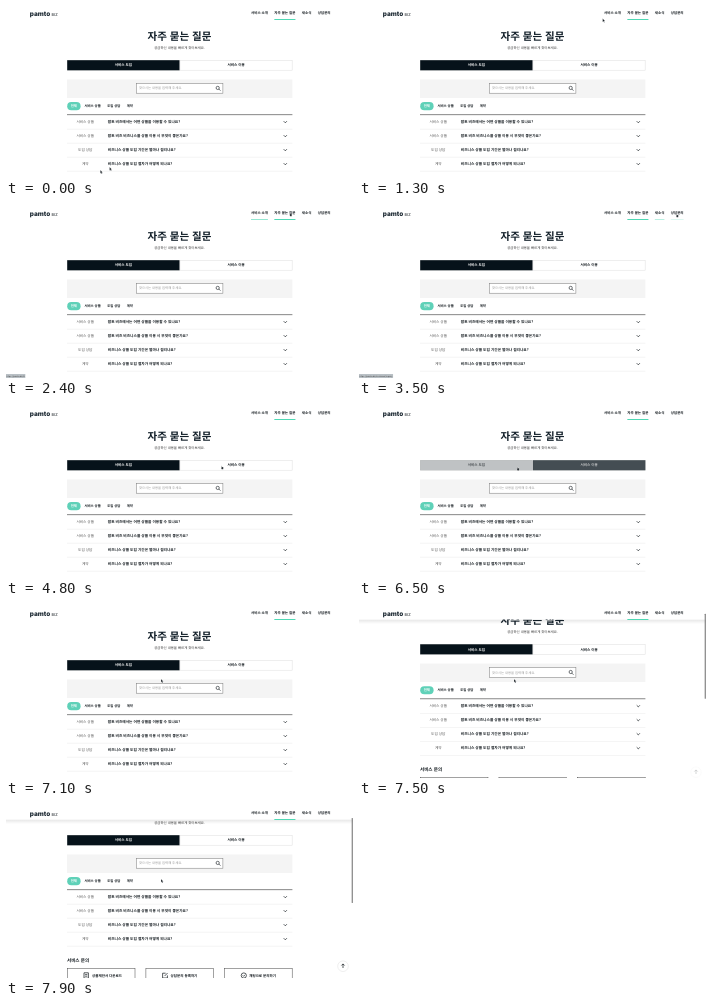
These frames come from a looping animation (347 px wide and 172 px high, 8000 ms). An HTML page:

```html
<!DOCTYPE html>
<html lang="ko">
<head>
<meta charset="utf-8">
<title>자주 묻는 질문</title>
<style>
html, body { margin: 0; width: 100%; height: 100%; overflow: hidden; background: #fff; }
svg { display: block; width: 100vw; height: 100vh; }
text { font-family: "Noto Sans CJK KR", "Noto Sans CJK", "Noto Sans CJK JP", sans-serif; text-rendering: geometricPrecision; }
.b { font-weight: 700; }
.m { font-weight: 500; }
.mid { text-anchor: middle; }
.brand, .latin { font-family: Inter, sans-serif; }
.brand { font-weight: 800; }
</style>
</head>
<body>
<svg id="stage" viewBox="0 0 347 172">
  <linearGradient id="shade" x2="0" y2="1">
    <stop stop-opacity="0.1"/><stop offset="1" stop-opacity="0"/>
  </linearGradient>
</svg>
<script>
const LOOP = 8000, STEP = 100;
const INK = '#10171c', DARK = '#06121a', TEAL = '#5fd1b8', MINT = '#4fd8b4';
const LEFT = 61, WIDTH = 225.4;
const stage = document.getElementById('stage');

function add(parent, tag, attrs, content) {
  const el = document.createElementNS('http://www.w3.org/2000/svg', tag);
  for (const k in attrs) el.setAttribute(k, attrs[k]);
  if (content) el.textContent = content;
  return parent.appendChild(el);
}
const group = p => add(p, 'g');
const rect = (p, x, y, width, height, fill, more) =>
  add(p, 'rect', { x, y, width, height, fill, ...more });
const frame = (p, x, y, w, h, stroke, more) =>
  rect(p, x, y, w, h, '#fff', { stroke, 'stroke-width': 0.5, ...more });
const path = (p, d, more) =>
  add(p, 'path', { d, fill: 'none', stroke: INK, 'stroke-width': 0.7, ...more });
const circle = (p, cx, cy, r, more) =>
  add(p, 'circle', { cx, cy, r, fill: 'none', stroke: INK, 'stroke-width': 0.6, ...more });
// y is the vertical middle of the line of text
const text = (p, s, x, y, size, cls = '', fill = INK) =>
  add(p, 'text', { x, y: y + size * 0.36, 'font-size': size, class: cls, fill }, s);

// Labels side by side with an even gap; returns the x and width of each
function textRow(p, labels, x, y, size, gap) {
  return labels.map(s => {
    const w = text(p, s, x, y, size, 'b').getComputedTextLength();
    const box = { x, w };
    x += w + gap;
    return box;
  });
}

const page = group(stage);
text(page, '자주 묻는 질문', 173.5, 30.3, 10.5, 'b mid', '#121f29');
text(page, '궁금하신 내용을 빠르게 찾아보세요.', 173.5, 41.7, 3.4, 'm mid', '#333');

const tabs = ['서비스 도입', '서비스 이용'].map((label, i) => {
  const w = WIDTH / 2, x = LEFT + i * w, cx = x + w / 2;
  frame(page, x + 0.25, 54.4, w - 0.5, 9.8, '#ddd');
  text(page, label, cx, 59.2, 3.55, 'b mid');
  const on = group(page);
  rect(on, x + 0.2, 54.2, w - 0.2, 10.1, DARK);
  text(on, label, cx, 59.2, 3.55, 'b mid', '#fff');
  return on;
});

rect(page, LEFT, 73.5, WIDTH, 18.5, '#f4f4f4');
frame(page, 130.3, 77.4, 86.6, 9.8, '#777');
text(page, '찾으시는 내용을 입력해 주세요.', 133, 82.3, 3.3, '', '#999');
circle(page, 211.7, 81.9, 1.6);
path(page, 'M212.9 83.1l1.5 1.5');

rect(page, LEFT + 0.2, 96.1, 13.4, 8.2, TEAL, { rx: 4.1 });
text(page, '전체', 67.8, 100.2, 3.4, 'b mid', '#fff');
rect(page, LEFT, 108.4, WIDTH, 0.7, '#555');

function makeList(chips, rows) {
  const g = group(page);
  textRow(g, chips, 78.4, 100.2, 3.35, 6.4);
  rows.forEach(([kind, question], i) => {
    const y = 116 + i * 14;
    text(g, kind, 79.2, y, 3.6, 'mid', '#555');
    text(g, question, 101.8, y, 3.68, 'b');
    path(g, `M277.7 ${y - 0.8}l1.6 1.6l1.6-1.6`);
    rect(g, LEFT, y + 6.9, WIDTH, 0.4, '#e3e3e3');
  });
  return g;
}

const lists = [
  makeList(
    ['서비스 상품', '도입 상담', '계약'],
    [['서비스 상품', '팜토 비즈에서는 어떤 상품을 이용할 수 있나요?'],
     ['서비스 상품', '팜토 비즈 비즈니스를 상품 이용 시 무엇이 좋은가요?'],
     ['도입 상담', '비즈니스 상품 도입 기간은 얼마나 걸리나요?'],
     ['계약', '비즈니스 상품 도입 절차가 어떻게 되나요?']]),
  makeList(
    ['가입문의', '비즈니스(법무용)', '사고/보험', '예약/결제', '차량문의', '충전', '쿠폰/기타'],
    [['가입', '가입 및 이용 조건은 어떻게 되나요?'],
     ['가입', '가입 절차는 어떻게 되나요?'],
     ['가입', '가입한 적이 없는데 이미 가입한 회원이라고 나오며 가입이 되지 않아요.'],
     ['가입', '본인 인증이 정상적으로 되지 않아요.'],
     ['로그인', '아이디/비밀번호를 분실했어요.']])
];

text(page, '서비스 문의', LEFT, 179.7, 4.55, 'b');
const icons = [
  'M0 0h4.4v5.4h-4.4zM1.1 1.8h2.2M1.1 3.4h2.2',
  'M3 .4h-3v4.8h4.8v-2.6M2 3.2l3-3',
  'M0 2.7a2.6 2.6 0 1 1 5.2 0a2.6 2.6 0 1 1-5.2 0M1.5 2.6l.9.9l1.4-1.5'
];
['상품제안서 다운로드', '상담문의 등록하기', '채팅으로 문의하기'].forEach((s, i) => {
  const x = LEFT + i * 78.6;
  frame(page, x + 0.3, 187.5, 67.7, 16, '#444');
  path(page, icons[i], { transform: `translate(${x + 17} 191.8)` });
  text(page, s, x + 25, 194.4, 3.5, 'b');
});

const shade = rect(stage, 0, 13.5, 347, 4.5, 'url(#shade)');
rect(stage, 0, 0, 347, 13.5, '#fff');
text(stage, 'pamto', 23.8, 7.6, 6.5, 'brand', '#14212b');
text(stage, 'BIZ', 45.6, 8.5, 3.9, 'latin');
const marks = textRow(stage, ['서비스 소개', '자주 묻는 질문', '새소식', '상담문의'], 245, 6.9, 3.47, 6.4)
  .map(({ x, w }) => rect(stage, x, 13, w, 1, MINT));

const status = group(stage);
const statusBox = rect(status, 0, 168, 18, 4, '#b9c0c5');
const statusText = text(status, '', 0.6, 170.3, 2, 'latin', '#444');

const bar = rect(stage, 345.7, 0, 1.1, 85, '#777', { rx: 0.5 });
const upBtn = group(stage);
circle(upBtn, 337, 160.2, 5.3, { fill: '#fff', stroke: '#e4e4e4' });
path(upBtn, 'M337 162v-4M335.4 159.5l1.6-1.6l1.6 1.6');

const arrow = 'M0 0v3.4l.8-.6l.6 1.2l.6-.3l-.6-1.2h1z';
const hand = 'M.7 0l.5 1.4l1.2.4l-.2 2h-1.5l-.7-1.6l.6-.1z';
const newCursor = () => path(stage, arrow, { fill: INK, stroke: '#fff', 'stroke-width': 0.25 });
const trail = newCursor(), cursor = newCursor();

// Each stroke of the mouse: start, end, and where it comes to rest
const strokes = [
  [0, 100, 131, 153], [200, 400, 193.5, 82], [500, 800, 225.5, 28.5],
  [1100, 1400, 250, 7], [2000, 2400, 283.5, 6.5], [2500, 2700, 299, 7], [3000, 3300, 317, 7.5],
  [3700, 4300, 213.5, 42.5], [4600, 4800, 215, 59.5],
  [5600, 6200, 159.5, 61], [6400, 6700, 153, 59.5], [6900, 7100, 155, 73]
];
// Nav items the mouse rests on: item, enter, leave, link
const hovers = [
  [0, 1400, 2200, '/#'], [2, 2600, 3200, '/customer/news'], [3, 3400, 3900, '/customer/inquiry']
];

const ramp = (t, a, b) => Math.min(1, Math.max(0, (t - a) / (b - a)));
const smooth = k => k * k * (3 - 2 * k);
const easeOut = k => 1 - (1 - k) ** 2.5;
const pulse = (t, on, off, span) => ramp(t, on, on + span) - ramp(t, off, off + span);
const alpha = (el, v) => el.setAttribute('opacity', v);
const place = (el, x, y) => el.setAttribute('transform', `translate(${x} ${y})`);

function mouseAt(t) {
  return strokes.reduce(([x, y], [a, b, toX, toY]) => {
    const k = smooth(ramp(t, a, b));
    return [x + (toX - x) * k, y + (toY - y) * k];
  }, [103.5, 161]);
}

function draw(t) {
  const second = pulse(t, 4900, 6400, 400);
  tabs.forEach((tab, i) => alpha(tab, i ? second : 1 - second));
  const open = t >= 5000 && t < 6500 ? 1 : 0;
  lists.forEach((g, i) => alpha(g, i === open ? 1 : 0));

  let link = '';
  for (const [item, enter, leave, url] of hovers) {
    alpha(marks[item], pulse(t, enter, leave, 500));
    if (t >= enter) link = 'https://pamto.biz' + url;
  }
  statusText.textContent = link;
  statusBox.setAttribute('width', statusText.getComputedTextLength() + 1.2);
  alpha(status, pulse(t, 1400, 4100, 300));

  const scroll = 25 * easeOut(ramp(t, 7300, 7900));
  place(page, 0, -scroll);
  place(bar, 0, scroll * 0.48);
  alpha(bar, scroll ? 1 : 0);
  alpha(shade, scroll ? 1 : 0);
  const rise = ramp(t, 7400, 7800);
  alpha(upBtn, rise);
  place(upBtn, 0, 8 * (1 - rise));

  const [x, y] = mouseAt(t);
  const onLink = y < 9 || (y > 54 && y < 64.5);
  cursor.setAttribute('d', onLink ? hand : arrow);
  place(cursor, x, y);
  place(trail, 94.3, 164);
  alpha(trail, t < 100 ? 1 : 0);
}

const start = performance.now();
function tick() {
  const t = (performance.now() - start) % LOOP;
  draw(Math.floor(t / STEP) * STEP);
  requestAnimationFrame(tick);
}
tick();
</script>
</body>
</html>
```
